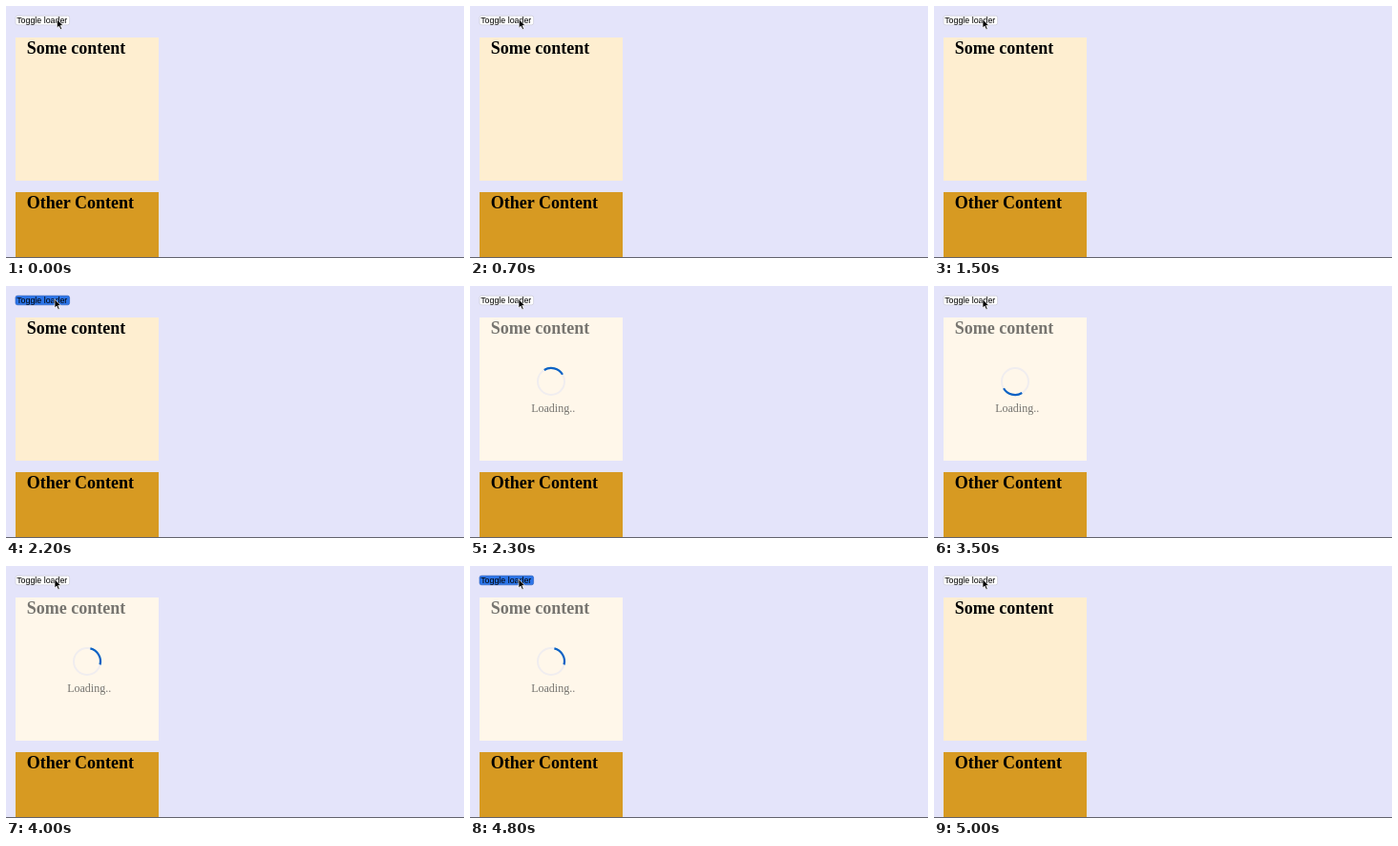
An HTML page for the animation above (5.1 s loop, 480 by 264 pixels).

```html
<!DOCTYPE html>
<html lang="en">
<head>
<meta charset="utf-8">
<title>Toggle loader</title>
<style>
  html, body { margin: 0; width: 100%; height: 100%; overflow: hidden; background: #e4e4fa; }
  svg { display: block; width: 480px; height: 264px; }
  .heading { font: bold 18px "Liberation Serif", Times, serif; }
  .status { font: 12px "Liberation Serif", Times, serif; fill: #777570; }
  .label { font: 8.85px "Liberation Sans", Arial, sans-serif; }
</style>
</head>
<body>
<svg viewBox="0 0 480 264">
  <rect width="480" height="264" fill="#e4e4fa"/>
  <rect y="263" width="480" height="1" fill="#62626c"/>

  <rect id="button" x="10" y="10.2" width="56.6" height="9.6" rx="2" stroke-width=".6"/>
  <text class="label" x="11.2" y="18">Toggle loader</text>

  <rect id="panel" x="10" y="33" width="150" height="150"/>
  <text id="title" class="heading" x="21.8" y="49.6">Some content</text>
  <g id="loader">
    <circle cx="85" cy="100" r="14" fill="none" stroke="#f0edef" stroke-width="2"/>
    <path id="arc" d="M75.1 90.1A14 14 0 0 1 94.9 90.1" fill="none" stroke="#0c62c4" stroke-width="2.2"/>
    <text class="status" x="64.2" y="131.6">Loading..</text>
  </g>

  <rect x="10" y="195" width="150" height="68" fill="#d79a22"/>
  <text class="heading" x="21.8" y="211.6">Other Content</text>

  <path id="cursor" d="M0 0V9.2L2.1 7.3L3.6 10.8L5.2 10.1L3.7 6.7H6.6Z" stroke="#fff" stroke-width=".7"/>
</svg>
<script>
  const LOOP = 5100, TICK = 100, SPIN = 800;
  const SHOW = 2300, HIDE = 4900, START_ANGLE = 14;
  const PRESSES = [[2200, 2300], [4800, 4900]];
  const POINTER = [[0, 53.4], [300, 52.2], [400, 52.2], [800, 51]];

  const [button, panel, title, loader, arc, cursor] =
    ["button", "panel", "title", "loader", "arc", "cursor"].map(id => document.getElementById(id));

  const within = (t, [from, to]) => t >= from && t < to;

  function pointerX(t) {
    const next = POINTER.findIndex(([time]) => time > t);
    if (next < 0) return POINTER[POINTER.length - 1][1];
    const [t0, x0] = POINTER[next - 1], [t1, x1] = POINTER[next];
    return x0 + (x1 - x0) * (t - t0) / (t1 - t0);
  }

  function draw(now) {
    const t = Math.floor((now % LOOP) / TICK) * TICK;
    const loading = within(t, [SHOW, HIDE]);
    const pressed = PRESSES.some(span => within(t, span));

    button.setAttribute("fill", pressed ? "#2b74e8" : "#fff");
    button.setAttribute("stroke", pressed ? "#2259b8" : "#c4c4d0");
    panel.setAttribute("fill", loading ? "#fff7ea" : "#feeed0");
    title.setAttribute("fill", loading ? "#777570" : "#000");
    loader.setAttribute("visibility", loading ? "visible" : "hidden");
    arc.setAttribute("transform", `rotate(${START_ANGLE + (t - SHOW) / SPIN * 360} 85 100)`);
    cursor.setAttribute("transform", `translate(${pointerX(t)} 13.8)`);
  }

  function frame() {
    draw(performance.now());
    requestAnimationFrame(frame);
  }
  frame();
</script>
</body>
</html>
```
